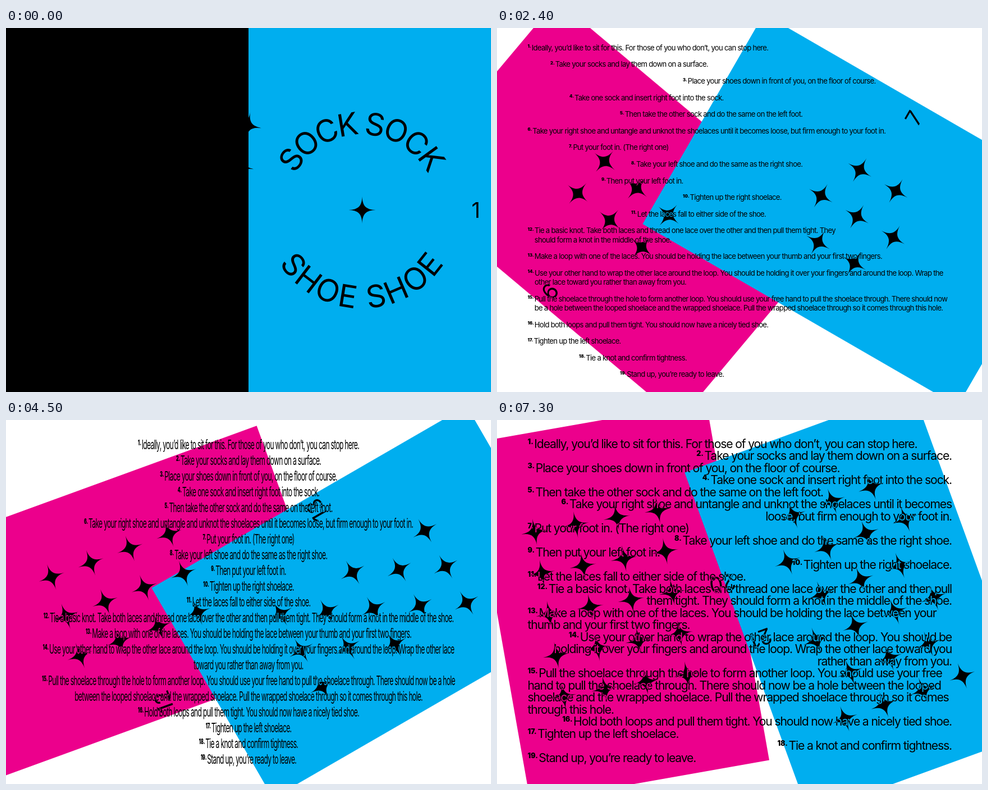
These frames come from a looping animation (864x648 px, 8 s). An HTML page with a canvas:

```html
<!DOCTYPE html>
<html lang="en">
<head>
<meta charset="utf-8">
<title>Sock Sock Shoe Shoe</title>
<style>
html, body { margin: 0; width: 100%; height: 100%; overflow: hidden; background: #fff; }
canvas { display: block; }
</style>
</head>
<body>
<canvas id="stage" width="864" height="648"></canvas>
<script>
const W = 864, H = 648, PINK = '#ec008c', BLUE = '#00aeef';
const FACE = 'Inter, "Liberation Sans", sans-serif';
const TRACK = -0.055, PITCH = 74.3;

const ctx = document.getElementById('stage').getContext('2d');
const inkLayer = document.createElement('canvas');
inkLayer.width = W;
inkLayer.height = H;
const ink = inkLayer.getContext('2d');

const STEPS = `Ideally, you’d like to sit for this. For those of you who don’t, you can stop here.
Take your socks and lay them down on a surface.
Place your shoes down in front of you, on the floor of course.
Take one sock and insert right foot into the sock.
Then take the other sock and do the same on the left foot.
Take your right shoe and untangle and unknot the shoelaces until it becomes loose, but firm enough to your foot in.
Put your foot in. (The right one)
Take your left shoe and do the same as the right shoe.
Then put your left foot in.
Tighten up the right shoelace.
Let the laces fall to either side of the shoe.
Tie a basic knot. Take both laces and thread one lace over the other and then pull them tight. They should form a knot in the middle of the shoe.
Make a loop with one of the laces. You should be holding the lace between your thumb and your first two fingers.
Use your other hand to wrap the other lace around the loop. You should be holding it over your fingers and around the loop. Wrap the other lace toward you rather than away from you.
Pull the shoelace through the hole to form another loop. You should use your free hand to pull the shoelace through. There should now be a hole between the looped shoelace and the wrapped shoelace. Pull the wrapped shoelace through so it comes through this hole.
Hold both loops and pull them tight. You should now have a nicely tied shoe.
Tighten up the left shoelace.
Tie a knot and confirm tightness.
Stand up, you’re ready to leave.`.split('\n').map(s => s.split(' '));

// Running text; {n} is a raised step number.
const LEFT = `{1}Ideally, you’d like to sit for this.
For those of you who don’t, you
can stop here.{2}Take your socks
and lay them down on a surface.{3}
Place your shoes down in front of
you, on the floor of course.{4}Take
one sock and insert right foot into
the sock.{5}Then take the other
sock and do the same on the left
foot.{6}Take your right shoe and
untangle and unknot the shoe-
laces until it becomes loose, but
firm enough to your foot in.{7}Put
your foot in. (The right one){8}Take
your left shoe and do the same
as the right shoe.{9}Then put your
left foot in.{10}Tighten up the right
shoelace.{11}Let the laces fall to ei-
ther side of the shoe.{12}Tie a basic
knot. Take both laces and thread
one lace over the other and then
pull them tight. They should form
a knot in the middle of the shoe.{13}`;
const RIGHT = `Make a loop with one of the laces.
You should be holding the lace be-
tween your thumb and your first
two fingers.{14}Use your other hand
to wrap the other lace around the
loop. You should be holding it over
your fingers and around the loop.
Wrap the other lace toward you
rather than away from you.{15}Pull
the shoelace through the hole to
form another loop. You should use
your free hand to pull the shoe-
lace through. There should now
be a hole between the looped
shoelace and the wrapped shoe-
lace. Pull the wrapped shoelace
through so it comes through this
hole.{16}Hold both loops and pull
them tight. You should now have
a nicely tied shoe.{17}Tighten up
the left shoelace.{18}Tie a knot
confirm tightness.{19}Stand up,
you’re ready to leave.`;

// Stars per row for each page; "|" means per column.
const GRIDS = ['', '1', '2', '3', '22', '212', '222', '|232', '|242', '333', '|343', '|434',
  '|444', '32323', '4343', '33333', '4444', '34343', '43434', '44344', '44444', '434343'];

function setFont(weight, size, track = TRACK) {
  ink.font = `${weight} ${size}px ${FACE}`;
  ink.letterSpacing = `${track * size}px`;
}

function setPart(isMark, o) {
  if (isMark) setFont(900, o.size * 0.59, 0);
  else setFont(400, o.size);
}

// Splits a line into runs with their offsets.
function measure(s, o) {
  let x = 0;
  const runs = s.split(/\{(\d+)\}/).map((text, i) => {
    const mark = i % 2 === 1;
    if (mark) text += '.';
    setPart(mark, o);
    const run = { text, mark, x };
    x += text ? ink.measureText(text).width : 0;
    if (mark) x = o.tab || x + o.size * 0.07;
    return run;
  });
  return { runs, width: x };
}

function line(s, x, y, o, align = 0) {
  const { runs, width } = measure(s, o), squeeze = o.squeeze || 1;
  ink.save();
  ink.translate(x - width * align * squeeze, y + o.size * 0.36);
  ink.scale(squeeze, 1);
  for (const r of runs) {
    setPart(r.mark, o);
    ink.fillText(r.text, r.x, r.mark ? -o.size * 0.33 : 0);
  }
  ink.restore();
}

const pick = (v, n) => typeof v === 'function' ? v(n) : v;

function steps(o, from = 1, to = 19) {
  let y = o.y;
  for (let n = from; n <= to; n++) {
    const words = STEPS[n - 1], cuts = [0, ...(o.cut[n] || []), words.length];
    const x = pick(o.x, n), align = pick(o.align || 0, n);
    const indent = o.hang ? measure(`{${n}}`, o).width : 0;
    for (let k = 0; k < cuts.length - 1; k++) {
      const s = words.slice(cuts[k], cuts[k + 1]).join(' ');
      line(k ? s : `{${n}}${s}`, k ? x + indent : x, y, o, align);
      y += o.lead;
    }
    y += o.gap - o.lead;
  }
}

const CUT = {
  column: { 1: [14], 6: [10], 12: [13, 26], 13: [13], 14: [13, 25], 15: [11, 22, 33, 42], 16: [12] },
  wide: { 12: [20], 14: [26], 15: [24] },
  centred: { 14: [28], 15: [27] },
  pair: {
    1: [10], 2: [8], 3: [10], 4: [8], 5: [10], 6: [7, 14], 8: [10], 12: [9, 18, 27], 13: [9, 16],
    14: [9, 17, 25, 33], 15: [8, 16, 23, 31, 37, 43], 16: [8]
  },
  swing: { 6: [13], 12: [17], 13: [16], 14: [15, 30], 15: [15, 30, 43] }
};
const INDENT = { 2: 95, 3: 331, 4: 129, 5: 219, 7: 128, 8: 239, 9: 186, 10: 331, 11: 239, 18: 146, 19: 219 };

const column = x => steps({ size: 11.15, lead: 14.4, gap: 14.4, x, y: 36, tab: 11.5, cut: CUT.column, hang: true });
const wide = o => steps({ size: 13.1, lead: 16.3, gap: 29.6, y: 35, cut: CUT.wide, ...o });
const swing = o => steps({ size: 21.2, lead: 21.5, gap: 21.5, y: 42, cut: CUT.swing, ...o });

function pair(x1, x2, o) {
  const base = { size: 17.6, lead: 18.15, y: 39, cut: CUT.pair, ...o };
  steps({ ...base, x: x1, gap: 42.7 }, 1, 11);
  steps({ ...base, x: x2, gap: 40.4 }, 12, 19);
}

function flow() {
  [LEFT, RIGHT].forEach((text, c) =>
    text.split('\n').forEach((s, i) => line(s, 54.5 + c * 405, 45 + i * 25, { size: 24 })));
}

function condensed() {
  steps({ size: 23, squeeze: 0.523, lead: 28, gap: 28, x: 432, y: 44, align: 0.5, cut: CUT.centred });
}

// Letters around the centre; side 1 runs over the top, -1 under the bottom.
function arcText(s, r, side, track) {
  const size = 55;
  setFont(400, size, 0);
  const widths = [...s].map(c => ink.measureText(c).width);
  const total = widths.reduce((a, b) => a + b) + track * size * (s.length - 1);
  let at = -total / 2;
  [...s].forEach((c, i) => {
    ink.save();
    ink.translate(633.5, 324);
    ink.rotate(side * (at + widths[i] / 2) / r);
    ink.fillText(c, -widths[i] / 2, -side * r);
    ink.restore();
    at += widths[i] + track * size;
  });
}

function star(x, y, turn = 0) {
  ink.save();
  ink.translate(x, y);
  ink.rotate(turn);
  ink.beginPath();
  ink.moveTo(0, -24);
  for (let i = 0; i < 4; i++) {
    ink.bezierCurveTo(0.6, -7, 7, -0.6, 24, 0);
    ink.rotate(Math.PI / 2);
  }
  ink.fill();
  ink.restore();
}

function starGrid(code, cx) {
  const cols = code[0] === '|';
  const counts = [...code.replace('|', '')].map(Number);
  counts.forEach((count, j) => {
    const across = (j - (counts.length - 1) / 2) * PITCH;
    for (let i = 0; i < count; i++) {
      const along = (i - (count - 1) / 2) * PITCH;
      if (cols) star(cx + across, along);
      else star(cx + along, across);
    }
  });
}

function page(n) {
  const side = n % 2 ? 1 : -1;
  const cx = 432 + side * 216, turn = -(n - 1) * Math.PI / 18;
  for (const c of [ctx, ink]) {
    c.save();
    c.translate(cx, 324);
    c.rotate(turn);
  }
  ctx.fillStyle = side > 0 ? BLUE : PINK;
  ctx.fillRect(-216, -324, 432, 648);
  starGrid(GRIDS[n], -side * 13.5);
  setFont(400, 38.5, 0);
  ink.textAlign = 'center';
  ink.fillText(n, side * 189, 14);
  ctx.restore();
  ink.restore();
}

function cover() {
  ctx.fillStyle = '#000';
  ctx.fillRect(0, 0, 432, H);
  star(431, 174, Math.PI / 18);
  star(417.5, 247, Math.PI / 18);
  arcText('SOCK SOCK', 134.5, 1, -0.078);
  arcText('SHOE SHOE', 175, -1, 0.068);
}

const SPREADS = [
  cover,
  () => column(54.5),
  () => column(459.5),
  () => wide({ x: n => INDENT[n] || 54.5, hang: true }),
  flow,
  () => wide({ x: 810, align: 1 }),
  condensed,
  () => pair(230, 635, { align: 0.5 }),
  () => pair(54.5, 459.5, { hang: true }),
  () => swing({ x: 54.5 }),
  () => swing({ x: n => n % 2 ? 54.5 : 810, align: n => n % 2 ? 0 : 1 })
];

function draw(i) {
  ctx.fillStyle = '#fff';
  ctx.fillRect(0, 0, W, H);
  ink.clearRect(0, 0, W, H);
  ink.globalCompositeOperation = 'xor'; // overlapping ink knocks out
  ink.fillStyle = '#000';
  if (i) page(2 * i);
  page(2 * i + 1);
  SPREADS[i]();
  ctx.drawImage(inkLayer, 0, 0);
}

let shown = -1;
const start = performance.now();
function tick() {
  const t = (performance.now() - start) % 8000;
  const i = t < 1000 ? 0 : 1 + Math.floor((t - 1000) / 700);
  if (i !== shown) draw(shown = i);
  requestAnimationFrame(tick);
}
tick();
</script>
</body>
</html>
```
